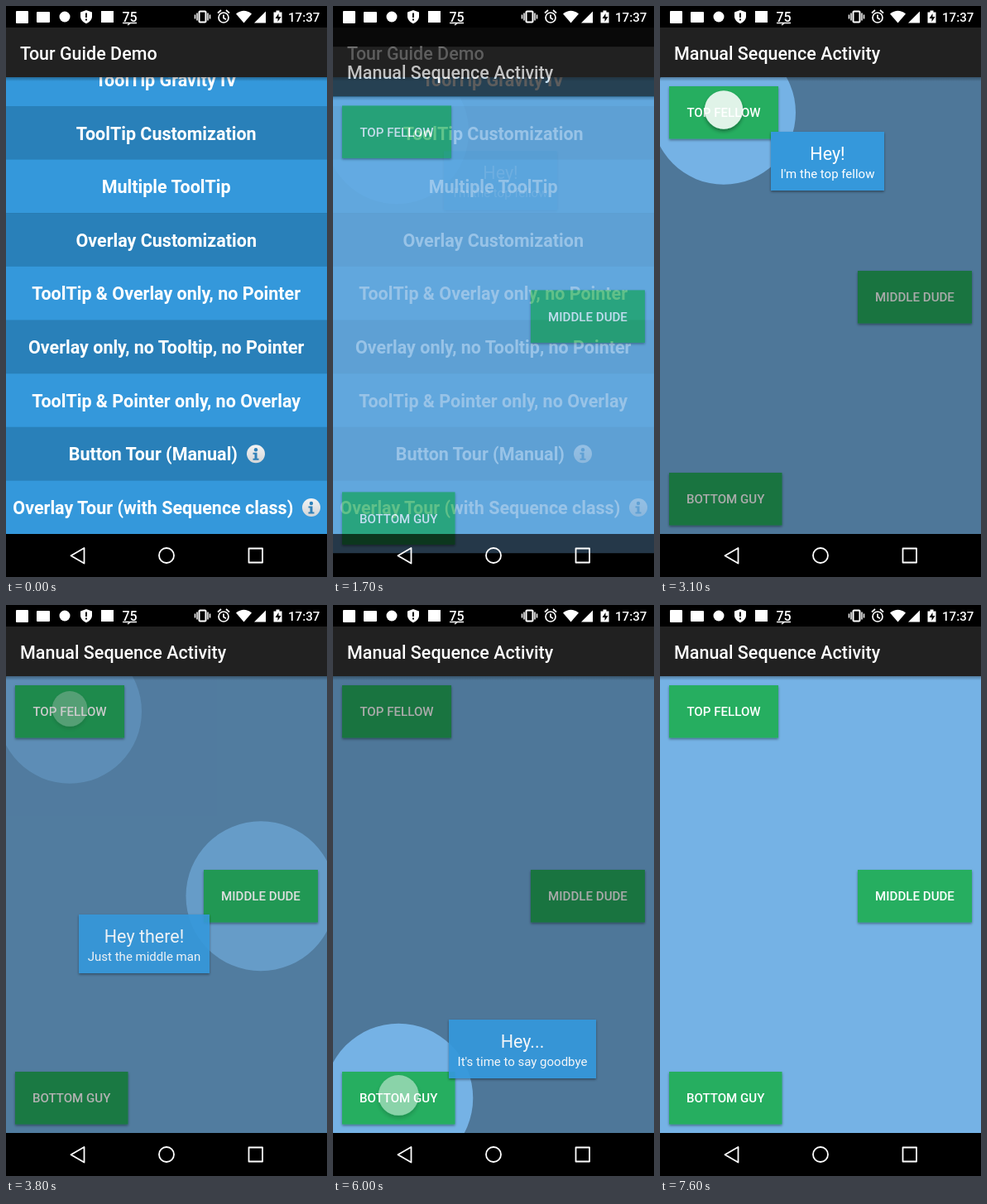
Write an HTML page that moves like this. It is 388x690 px and loops after 7.7 s.

```html
<!DOCTYPE html>
<html lang="en">
<head>
<meta charset="utf-8">
<title>Guided tour</title>
<style>
  html, body { margin: 0; width: 100%; height: 100%; overflow: hidden; background: #000; }
  svg { display: block; width: 100%; height: 100%; }
  text { font-family: Roboto, "Noto Sans", sans-serif; fill: #fff; }
  .title { font-size: 21.5px; font-weight: 500; }
  .row { font-size: 21.5px; font-weight: 700; }
  .label { font-size: 15.1px; font-weight: 500; }
  .tipTitle { font-size: 21.5px; }
  .tipText { font-size: 15px; }
  .mid { text-anchor: middle; }
  .line { fill: none; stroke: #fff; }
</style>
</head>
<body>
<svg id="stage" viewBox="0 0 388 690">
  <defs>
    <clipPath id="content"><rect y="86" width="388" height="552"/></clipPath>
    <filter id="shadow" x="-20%" y="-20%" width="140%" height="150%">
      <feDropShadow dx="0" dy="1.5" stdDeviation="1.6" flood-color="#000" flood-opacity=".42"/>
    </filter>
    <filter id="softShadow" x="-30%" y="-30%" width="160%" height="170%">
      <feDropShadow dx="0" dy="3" stdDeviation="2.5" flood-color="#000" flood-opacity=".4"/>
    </filter>
    <linearGradient id="edge" x1="0" y1="0" x2="0" y2="1">
      <stop offset="0" stop-opacity=".3"/>
      <stop offset="1" stop-opacity="0"/>
    </linearGradient>
    <linearGradient id="badge" x1="0" y1="0" x2="0" y2="1">
      <stop offset="0" stop-color="#f4f4f4"/>
      <stop offset="1" stop-color="#d3d5d7"/>
    </linearGradient>
  </defs>
  <rect width="388" height="690"/>
  <g id="list"></g>
  <g id="tour"></g>
  <rect y="638" width="388" height="52" opacity=".55"/>
  <rect width="388" height="26"/>

  <g id="status" fill="#fff">
    <rect x="12" y="6" width="15" height="15" rx="1"/>
    <rect x="37" y="7" width="16" height="13" rx="1"/>
    <circle cx="71" cy="13" r="6.5"/>
    <path d="M97 5l7 2.6v5c0 4-3 7-7 8.7-4-1.7-7-4.700-7-8.700v-5z"/>
    <path d="M97 8.500v5.500M97 15.500v2" stroke="#000" stroke-width="2"/>
    <rect x="115" y="6" width="15" height="14"/>
    <text x="149.500" y="18.500" class="mid" font-size="16" font-weight="500">75</text>
    <path d="M141 20.500h17M147 23l3-2" class="line" stroke-width="1.300"/>
    <rect x="233.500" y="6.500" width="8" height="13" rx="1" class="line" stroke-width="2"/>
    <path d="M231 8.500v9M228.500 10.500v5M244 8.500v9M246.500 10.500v5" class="line" stroke-width="1.500"/>
    <g class="line" stroke-width="1.700">
      <circle cx="263" cy="14" r="6"/>
      <path d="M263 10.500v4l3 1.800M256 8.500l4-3.500M270 8.500l-4-3.500"/>
    </g>
    <path d="M278 9.500q9.500-7.500 19 0l-9.500 11z"/>
    <path d="M300 20.500h14v-14z"/>
    <path d="M323.500 7.500h3v-2h4v2h3v13h-10z"/>
    <path d="M329.500 9l-4 6h3v4l4-6h-3z" fill="#000"/>
    <text x="341" y="18.700" font-size="15.100" font-weight="500">17:37</text>
  </g>
  <g class="line" stroke-width="1.800" stroke-linejoin="round">
    <path d="M94.500 655v18.500l-16-9.250z"/>
    <circle cx="194" cy="664" r="9"/>
    <rect x="293.500" y="655.500" width="16.500" height="17"/>
  </g>
</svg>
<script>
const LOOP = 7700, FADE = 600, TIP_IN = 1000;
const OPEN = 1646, POINTER_DELAY = 400;
const SLIDE = 55, POINTER_R = 24.4;
const get = id => document.getElementById(id);
const clamp = x => Math.max(0, Math.min(1, x));
const rect = (x, y, w, h, fill, more = '') =>
  `<rect x="${x}" y="${y}" width="${w}" height="${h}" fill="${fill}" ${more}/>`;
const text = (x, y, cls, s) => `<text x="${x}" y="${y}" class="${cls}">${s}</text>`;

const header = title =>
  rect(0, 26, 388, 60, '#212121') + rect(0, 86, 388, 5, 'url(#edge)') + text(17, 64.5, 'title', title);

// Menu screen
const rows = ['ToolTip Gravity IV', 'ToolTip Customization', 'Multiple ToolTip', 'Overlay Customization',
  'ToolTip &amp; Overlay only, no Pointer', 'Overlay only, no Tooltip, no Pointer',
  'ToolTip &amp; Pointer only, no Overlay', 'Button Tour (Manual)', 'Overlay Tour (with Sequence class)'];
const infoX = { 7: 302, 8: 369 };
const ROW_H = 64.62;

function info(x, y) {
  return `<circle cx="${x}" cy="${y}" r="11" fill="url(#badge)"/>
    <circle cx="${x}" cy="${y - 5}" r="2.2" fill="#2f80b8"/>
    <path d="M${x - 3.5} ${y - 1.5}h5v7h2v2h-7v-2h2v-5h-2z" fill="#2f80b8"/>`;
}

function menuRow(label, i) {
  const top = 121 + (i - 1) * ROW_H, icon = infoX[i];
  return rect(0, top, 388, ROW_H + 0.5, i % 2 ? '#2980b9' : '#3498db') +
    text(icon ? 177.8 : 193.7, top + 40.5, 'row mid', label) +
    (icon ? info(icon, top + 32.6) : '');
}

get('list').innerHTML = `<g clip-path="url(#content)">${rows.map(menuRow).join('')}</g>` +
  header('Tour Guide Demo');

// Tour screen: each step has a button, a spotlight, a tooltip and its time span
const steps = [
  { label: 'TOP FELLOW', x: 11, y: 97, w: 132, r: 87, tip: [134, 152, 137],
    head: 'Hey!', body: "I'm the top fellow", from: 1590, to: 3455 },
  { label: 'MIDDLE DUDE', x: 239, y: 320, w: 138, r: 90.5, tip: [88, 374, 158],
    head: 'Hey there!', body: 'Just the middle man', from: 3455, to: 5185 },
  { label: 'BOTTOM GUY', x: 11, y: 564, w: 136.5, r: 90, tip: [140, 501, 178],
    head: 'Hey...', body: "It's time to say goodbye", from: 5185, to: 6875 }
];
const BUTTON_H = 63.5;

for (const s of steps) {
  s.cx = s.x + s.w / 2;
  s.cy = s.y + BUTTON_H / 2;
}

const button = s => rect(s.x, s.y, s.w, BUTTON_H, '#27ae60', 'filter="url(#shadow)"') +
  text(s.cx, s.cy + 5.7, 'label mid', s.label);

function guide(s, i) {
  const [x, y, w] = s.tip, { cx, cy, r } = s, mid = x + w / 2;
  const hole = `M${cx - r} ${cy}a${r} ${r} 0 1 0 ${2 * r} 0a${r} ${r} 0 1 0 ${-2 * r} 0z`;
  return `<g id="veil${i}">
      <path d="M0 86H388V638H0z${hole}" fill="#000" fill-opacity=".333" fill-rule="evenodd"/>
      <g id="pointer${i}"><circle r="${POINTER_R}" fill="#fff" filter="url(#softShadow)"/></g>
    </g>
    <g id="tip${i}">${rect(x, y, w, 71, '#3498db', 'filter="url(#shadow)"')}
      ${text(mid, y + 33.7, 'tipTitle mid', s.head)}${text(mid, y + 56, 'tipText mid', s.body)}
    </g>`;
}

get('tour').innerHTML = rect(0, 0, 388, 26, '#000') + rect(0, 638, 388, 90, '#000') +
  `<g clip-path="url(#content)">${rect(0, 86, 388, 552, '#75b2e5')}
    ${steps.map(button).join('')}${steps.map(guide).join('')}</g>` + header('Manual Sequence Activity');

steps.forEach((s, i) => {
  s.veil = get('veil' + i);
  s.pointer = get('pointer' + i);
  s.tipBox = get('tip' + i);
});

const ease = x => (1 - Math.cos(Math.PI * clamp(x))) / 2;

function bounce(x) {
  const t = clamp(x) * 1.1226;
  if (t < 0.3535) return 8 * t * t;
  if (t < 0.7408) return 8 * (t - 0.54719) ** 2 + 0.7;
  if (t < 0.9644) return 8 * (t - 0.8526) ** 2 + 0.9;
  return 8 * (t - 1.0435) ** 2 + 0.95;
}

const show = (el, alpha) => {
  el.setAttribute('opacity', clamp(alpha).toFixed(4));
  el.setAttribute('display', alpha > 0 ? 'inline' : 'none');
};

function drawStep(s, t) {
  show(s.veil, ease((t - s.from) / FADE) * (1 - ease((t - s.to) / FADE)));
  show(s.tipBox, t > s.from && t < s.to ? bounce((t - s.from) / TIP_IN) : 0);
  // Fade in, press down, then release while fading out
  const p = t - s.from - POINTER_DELAY;
  const scale = 1 - 0.15 * (ease((p - 800) / 800) - ease((p - 1600) / 800));
  show(s.pointer, 0.86 * ease(p / 800) * (1 - ease((p - 1600) / 2000)));
  s.pointer.setAttribute('transform', `translate(${s.cx} ${s.cy - 3.3}) scale(${scale})`);
}

function draw(t) {
  const tour = get('tour'), age = t - OPEN;
  show(tour, age > 0 ? 1 - (1 - clamp(age / 200)) ** 4 : 0);
  tour.setAttribute('transform', `translate(0 ${SLIDE * (1 - clamp(age / 350)) ** 5})`);
  for (const s of steps) drawStep(s, t);
}

const start = performance.now();
function tick() {
  draw((performance.now() - start) % LOOP);
  requestAnimationFrame(tick);
}
tick();
</script>
</body>
</html>
```
